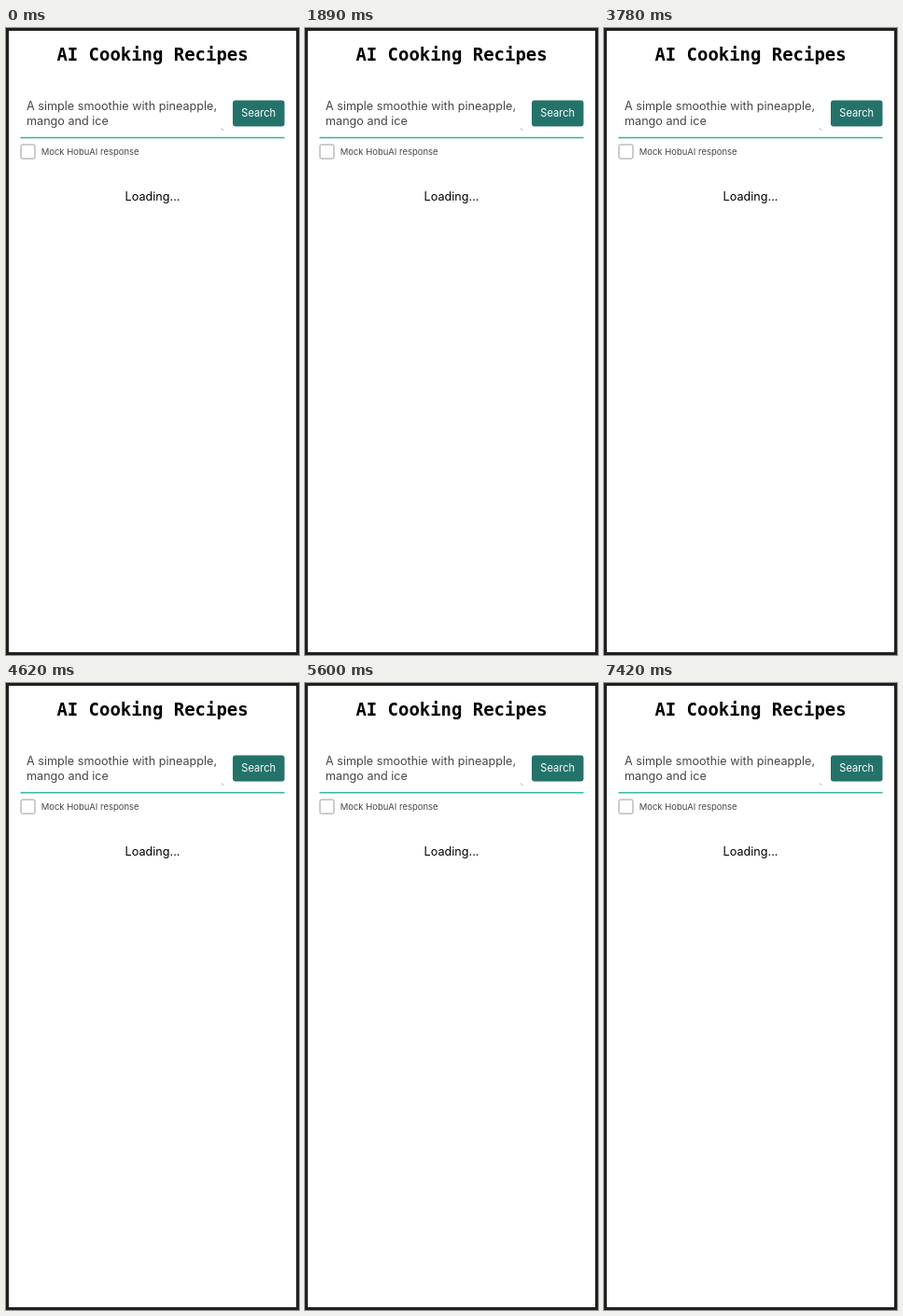
Animation, 314 px wide and 672 px high, one loop 8000 ms. Source, as an HTML page:

```html
<!DOCTYPE html>
<html lang="en">
<head>
<meta charset="utf-8">
<title>AI Cooking Recipes</title>
<style>
  html, body { margin: 0; width: 100%; height: 100%; overflow: hidden; background: #fff; }
  svg { display: block; }
  text { font: 12.64px Inter, sans-serif; }
  .title { font: bold 18.96px "DejaVu Sans Mono", monospace; }
  .query { fill: #464649; }
  .button { font-size: 11.06px; fill: #fff; }
  .label { font-size: 9.48px; fill: #464649; }
  .mid { text-anchor: middle; }
</style>
</head>
<body>
<!-- The loading state holds still for the whole loop. -->
<svg width="314" height="672" viewBox="0 0 314 672">
  <rect x="1.5" y="1.5" width="311" height="669" fill="#fff" stroke="#231f20" stroke-width="3"/>
  <text class="title mid" x="157" y="35">AI Cooking Recipes</text>

  <text class="query" x="22" y="88">A simple smoothie with pineapple,</text>
  <text class="query" x="22" y="104">mango and ice</text>
  <path d="M231 107.5l2 2" stroke="#777" stroke-width=".8"/>
  <rect x="15.5" y="116.8" width="283" height="1.5" fill="#2cb5a0"/>

  <rect x="243" y="77.5" width="55.5" height="28" rx="3" fill="#24736b"/>
  <text class="button mid" x="270.7" y="95">Search</text>

  <rect x="16" y="125" width="15" height="15" rx="1.5" fill="#fff" stroke="#999"/>
  <text class="label" x="37.7" y="136">Mock HobuAI response</text>

  <text class="mid" x="157" y="185">Loading...</text>
</svg>
</body>
</html>
```
